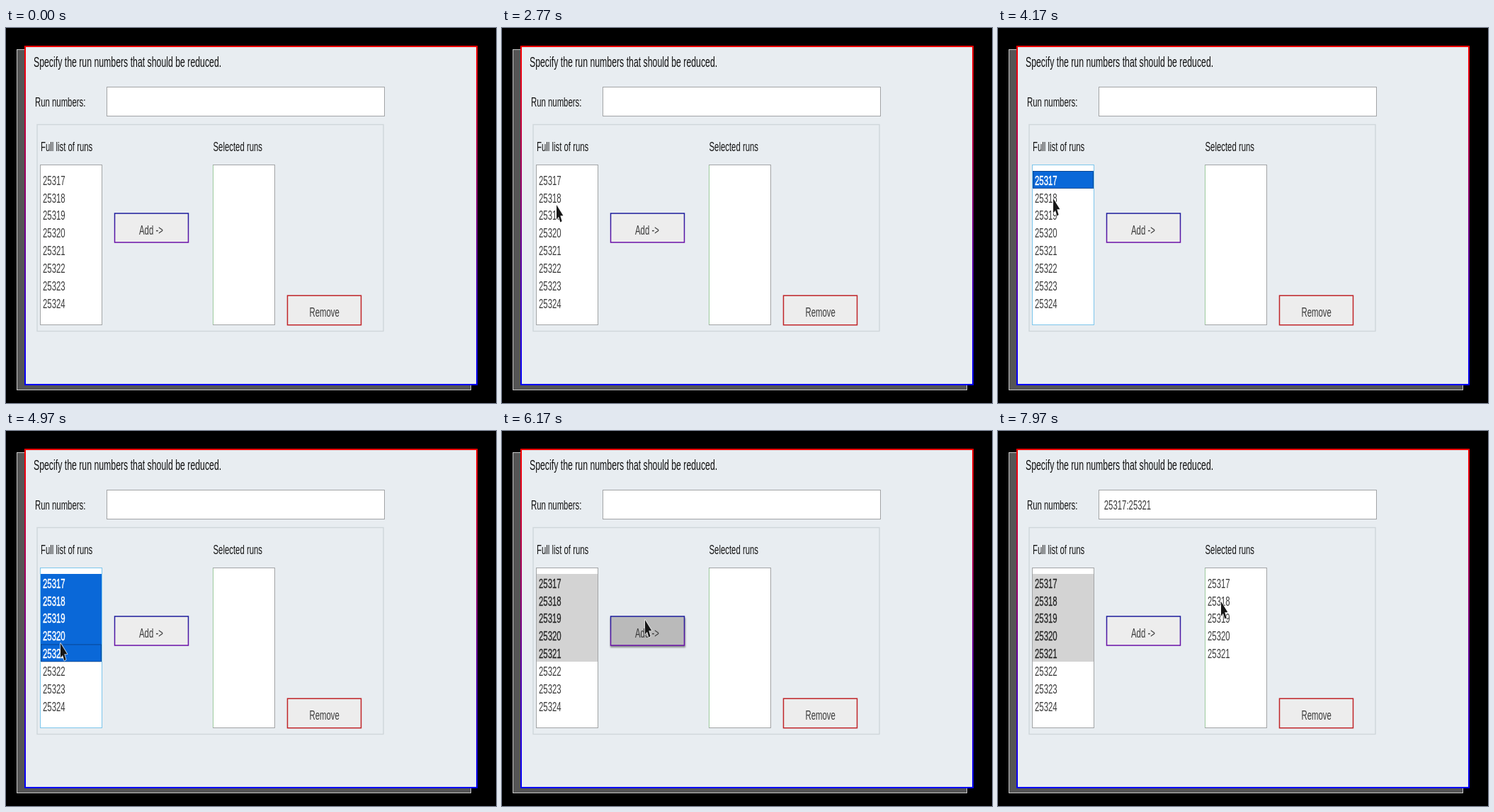
These frames come from a looping animation (692 px wide and 530 px high, 8000 ms). An HTML page:

```html
<!DOCTYPE html>
<html lang="en">
<head>
<meta charset="utf-8">
<title>Run selection</title>
<style>
  html, body { margin: 0; width: 100%; height: 100%; overflow: hidden; background: #000; }
  svg { display: block; width: 692px; height: 530px; }
  text { font-family: "Liberation Sans", Arial, sans-serif; font-size: 18.5px; fill: #3c3c3c; }
  .label { fill: #161616; }
  .title { font-size: 20px; fill: #111; }
  .on { fill: #fff; stroke: #fff; stroke-width: .55px; }
  .kept { fill: #262626; stroke: #262626; stroke-width: .35px; }
  .box { fill: #fff; stroke: #a2a4a6; }
</style>
</head>
<body>
<svg id="stage" viewBox="0 0 692 530">
  <defs>
    <linearGradient id="frame" gradientUnits="userSpaceOnUse" x1="0" y1="26" x2="0" y2="504">
      <stop offset="0" stop-color="#f00"/><stop offset="1" stop-color="#00f"/>
    </linearGradient>
    <linearGradient id="addEdge" gradientUnits="userSpaceOnUse" x1="0" y1="262" x2="0" y2="303">
      <stop offset="0" stop-color="#1c1c9c"/><stop offset="1" stop-color="#6a10a8"/>
    </linearGradient>
    <filter id="soft"><feGaussianBlur stdDeviation="1"/></filter>
  </defs>
  <rect x="15.5" y="30.5" width="641" height="481" fill="#555" stroke="#c8c8c8"/>
  <rect x="27" y="26" width="638" height="478" fill="#e8edf1" stroke="url(#frame)" stroke-width="2"/>
  <rect class="box" x="142.5" y="83.5" width="392" height="41"/>
  <rect x="44" y="136.5" width="489" height="292" fill="none" stroke="#cfd6da" stroke-width="1.4"/>
  <rect id="fullList" class="box" x="48.5" y="193.5" width="87" height="226"/>
  <rect class="box" x="292.5" y="193.5" width="87" height="226"/>
  <path d="M292.5 194V419" stroke="#9ccb9e"/>
  <rect id="picked" x="49" y="202" width="86" height="24.8"/>
  <rect id="focusRow" x="50" y="202.5" width="84.5" height="24" fill="none" stroke="#06234f" stroke-dasharray="1 1"/>
  <rect id="addShadow" x="153" y="264" width="106" height="42" fill="#000" opacity=".4" filter="url(#soft)"/>
  <rect id="add" x="153.5" y="262" width="104" height="41" stroke="url(#addEdge)" stroke-width="1.5"/>
  <rect x="397.5" y="378.2" width="104" height="41.5" fill="#ededed" stroke="#c02428" stroke-width="1.5"/>
  <g id="words"></g>
  <path id="cursor" d="M0 0V20.5L3 16.7L5.4 24.5L7.6 23L5.3 15.2H9.4Z"
        fill="#161616" stroke="#fff" stroke-opacity=".8" stroke-width="1.6" paint-order="stroke" stroke-linejoin="round"/>
</svg>
<script>
const LOOP = 8000, STEP = 100, PHASE = 70;
const FIRST_RUN = 25317, ROW = 24.85;
const CLICK = 3870, SHIFT_CLICK = 4970, PRESS = 6170, RELEASE = 6370;
const $ = id => document.getElementById(id);

// Pointer tip: time, x, y
const path = [
  [770, 33, 444], [970, 48, 380], [1170, 66, 300], [1370, 75, 259],
  [1570, 77, 235], [1870, 76, 216], [2370, 76, 216], [2470, 77, 221],
  [2770, 77, 250], [2970, 74, 267], [3070, 74, 267], [3570, 75, 211],
  [3870, 75, 211], [4170, 78, 241], [4670, 77, 300], [5170, 77, 300],
  [5770, 202, 267], [6770, 202, 267], [7170, 245, 284], [7470, 296, 275],
  [7670, 311, 250], [7970, 315, 241]
];

// All lettering shares one condensed face
function word(x, y, str, cls = "") {
  const el = document.createElementNS("http://www.w3.org/2000/svg", "text");
  el.setAttribute("transform", `translate(${x} ${y}) scale(.615 1)`);
  el.setAttribute("class", cls);
  el.textContent = str;
  return $("words").appendChild(el);
}

const column = (x, count) => Array.from({ length: count },
  (_, i) => word(x, 221.7 + i * ROW, FIRST_RUN + i));

word(39, 55, "Specify the run numbers that should be reduced.", "title");
word(41, 111, "Run numbers:", "label");
word(49, 173.5, "Full list of runs", "label");
word(292.5, 173.5, "Selected runs", "label");
word(188, 291.7, "Add ->");
word(428.5, 408, "Remove");
const rows = column(52, 8);
const results = [...column(296, 5), word(149.8, 111.3, "25317:25321")];

function pointer(t) {
  const i = path.findIndex(p => p[0] > t);
  if (i < 0) return path[path.length - 1].slice(1);
  if (i === 0) return null;
  const [t0, x0, y0] = path[i - 1], [t1, x1, y1] = path[i];
  const k = (t - t0) / (t1 - t0);
  return [x0 + (x1 - x0) * k, y0 + (y1 - y0) * k];
}

const show = (el, on) => el.setAttribute("visibility", on ? "visible" : "hidden");

function draw(now) {
  const t = Math.floor((now % LOOP - PHASE) / STEP) * STEP + PHASE;
  const tip = pointer(t);
  show($("cursor"), tip);
  if (tip) $("cursor").setAttribute("transform", `translate(${tip})`);

  const count = t < CLICK ? 0 : t < SHIFT_CLICK ? 1 : 5;
  const active = count > 0 && t < PRESS;
  $("picked").setAttribute("height", count * 24.8);
  $("picked").setAttribute("fill", active ? "#0a68d8" : "#d3d3d3");
  $("fullList").style.stroke = active ? "#7cc6ec" : "";
  $("focusRow").setAttribute("y", 202.5 + Math.max(0, count - 1) * ROW);
  show($("focusRow"), active);
  rows.forEach((el, i) => el.setAttribute("class", i >= count ? "" : active ? "on" : "kept"));

  const hover = tip && tip[0] > 153 && tip[0] < 258 && tip[1] > 262 && tip[1] < 303;
  const pressed = t >= PRESS && t < RELEASE;
  show($("addShadow"), hover);
  $("add").setAttribute("fill", pressed ? "#bababa" : "#ededed");
  results.forEach(el => show(el, t >= RELEASE));
}

const start = performance.now();
function tick() {
  draw(performance.now() - start);
  requestAnimationFrame(tick);
}
tick();
</script>
</body>
</html>
```
